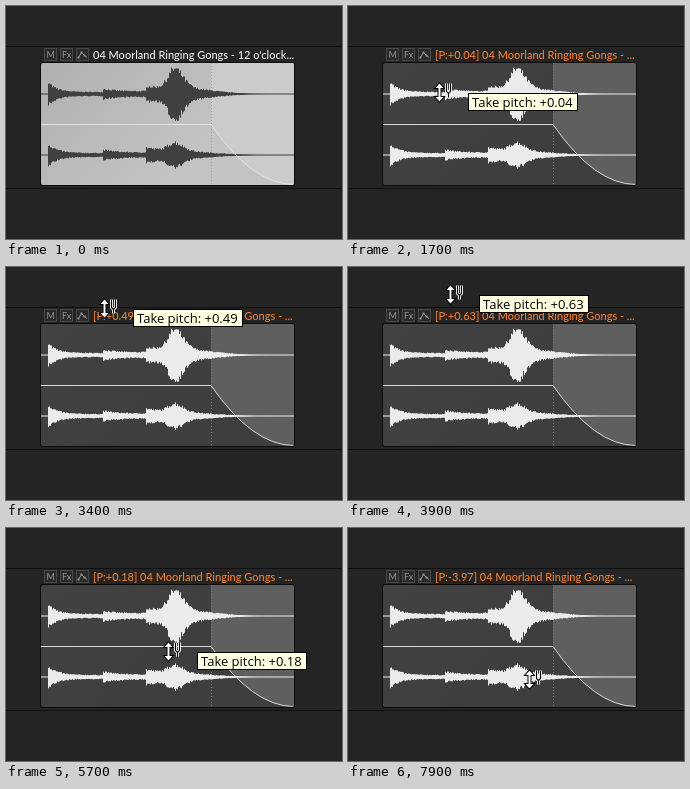
These frames come from a looping animation (336 by 233 pixels, 8 s). An HTML page with a canvas:

```html
<!DOCTYPE html>
<html lang="en">
<head>
<meta charset="utf-8">
<title>Take pitch drag</title>
<style>
  html, body { margin: 0; width: 100%; height: 100%; overflow: hidden; background: #242424; }
  canvas { display: block; }
</style>
</head>
<body>
<canvas id="stage" width="336" height="233"></canvas>
<script>
const ctx = document.getElementById('stage').getContext('2d');
const LOOP = 8000, STEP = 100;
const DRAG_START = 1000, DRAG_PAUSE = 4500, DRAG_RESUME = 5300, DRAG_END = 6500;
const NAME = '04 Moorland Ringing Gongs - ';
const ITEM = { x: 35, y: 57, w: 253, h: 122 };
const FADE_X = 205, GAIN_Y = 118.5, BOTTOM = ITEM.y + ITEM.h, RIGHT = ITEM.x + ITEM.w;

// Mouse moves; between them the pointer rests.
const moves = [
  { from: 100, to: 500, x: 103, y: 106 },
  { from: 700, to: 800, x: 91, y: 91 },
  { from: 1400, to: 2300, x: 92, y: 78 },
  { from: 2300, to: 2500, x: 93, y: 70 },
  { from: 2600, to: 3500, x: 99, y: 38 },
  { from: 3700, to: 3900, x: 102, y: 28 },
  { from: DRAG_PAUSE, to: 5200, x: 160, y: 79 },
  { from: DRAG_RESUME, to: 5800, x: 162, y: 135 },
  { from: 6000, to: 6400, x: 164, y: 179 },
  { from: DRAG_END, to: 6900, x: 186, y: 188 },
  { from: 7600, to: 7700, x: 185, y: 201 },
  { from: 7700, to: 7900, x: 181, y: 152 }
];

const clamp = v => Math.max(0, Math.min(1, v));
const mix = (a, b, k) => a + (b - a) * k;

function pointer(t) {
  let x = 51, y = 100;
  for (const m of moves) {
    const k = clamp((t - m.from) / (m.to - m.from));
    x = mix(x, m.x, k);
    y = mix(y, m.y, k);
  }
  return { x, y };
}

// One cent per pixel while dragging, then a coarse run down to the last value.
function cents(t, y) {
  if (t < DRAG_START) return 0;
  if (t <= DRAG_PAUSE) return Math.floor(91 - y);
  if (t <= DRAG_RESUME) return 63;
  if (t <= DRAG_END) return Math.floor(142 - y);
  return Math.round(mix(-37, -397, 1 - (1 - clamp((t - DRAG_END) / 600)) ** 3));
}

// Three struck notes over a thin bed, and one long swell.
const strike = (x, at, height, decay) => x < at ? 0 : height * Math.exp((at - x) / decay);
const bed = x => x < 42 ? 0 : 2.2 * clamp((250 - x) / 80);
const notes = x => bed(x) + strike(x, 42, 10, 9) + strike(x, 97, 3.5, 18) + strike(x, 140, 5.5, 20);
function swell(x) {
  const d = x - 168;
  return 18 * Math.exp(-((d / (d < 0 ? 9 : 12)) ** 2)) + 7 * Math.exp(-Math.abs(d) / (d < 0 ? 14 : 36)) * clamp((265 - x) / 60);
}

let seed = 7;
const random = () => (seed = seed * 16807 % 2147483647) / 2147483647;
const rough = () => .72 + .32 * random();
const channels = [{ mid: 88, gain: 1 }, { mid: 149, gain: .42 }].map(({ mid, gain }) => ({
  mid,
  columns: Array.from({ length: ITEM.w }, (_, i) => {
    const level = notes(ITEM.x + i) + gain * swell(ITEM.x + i);
    return { up: level * rough(), down: level * rough() };
  })
}));

function rect(x, y, w, h, color) {
  ctx.fillStyle = color;
  ctx.fillRect(x, y, w, h);
}

function text(str, x, y, font, color) {
  ctx.font = font;
  ctx.fillStyle = color;
  ctx.fillText(str, x, y);
}

function line(points, color, width = 1) {
  ctx.beginPath();
  points.forEach(p => ctx.lineTo(...p));
  ctx.strokeStyle = color;
  ctx.lineWidth = width;
  ctx.stroke();
}

function drawTrack() {
  rect(0, 0, 336, 233, '#242424');
  for (const y of [40, 182]) rect(0, y, 336, 1, '#101010');
}

function drawButtons() {
  const font = '9px Lato, sans-serif', ink = '#959595';
  for (const x of [38, 54, 70]) {
    rect(x, 42, 13, 13, '#484848');
    rect(x + 1, 43, 11, 11, '#292929');
  }
  text('M', 40.5, 52, font, ink);
  text('Fx', 56, 52, font, ink);
  const nodes = [[72.5, 51.5], [75.5, 46.5], [78.5, 49.5], [81, 51.5]];
  line(nodes, ink);
  nodes.slice(0, 3).forEach(([x, y]) => rect(x - 1, y - 1, 2, 2, ink));
}

function fadePath(startX, startY) {
  ctx.beginPath();
  ctx.moveTo(startX, startY);
  ctx.lineTo(FADE_X, GAIN_Y);
  ctx.quadraticCurveTo((FADE_X + RIGHT) / 2, BOTTOM - .5, RIGHT, BOTTOM - .5);
}

function drawItem(light) {
  const { x, y, w, h } = ITEM;
  const ink = light ? '#404040' : '#ebebeb';
  const shade = ctx.createLinearGradient(x, y, x + 120, BOTTOM);
  shade.addColorStop(0, light ? '#b0b0b0' : '#424242');
  shade.addColorStop(1, light ? '#c3c3c3' : '#3e3e3e');

  ctx.beginPath();
  ctx.roundRect(x - 1, y - 1, w + 2, h + 2, 3);
  ctx.fillStyle = '#0c0c0c';
  ctx.fill();

  ctx.save();
  ctx.beginPath();
  ctx.roundRect(x, y, w, h, 2);
  ctx.fillStyle = shade;
  ctx.fill();
  ctx.clip();

  fadePath(FADE_X, y);
  ctx.lineTo(RIGHT, y);
  ctx.fillStyle = light ? '#cbcbcb' : '#5f5f5f';
  ctx.fill();

  ctx.setLineDash([1, 2]);
  line([[FADE_X + .5, y], [FADE_X + .5, BOTTOM]], light ? '#a4a4a4' : '#787878');
  ctx.setLineDash([]);

  for (const { mid, columns } of channels) {
    rect(x, mid - .5, w, 1, ink);
    columns.forEach(({ up, down }, i) => rect(x + i, mid - up, 1, up + down, ink));
  }

  fadePath(x, GAIN_Y);
  ctx.strokeStyle = light ? '#e2e2e2' : '#d8d8d8';
  ctx.stroke();
  ctx.restore();
}

function drawCursor(x, y) {
  ctx.save();
  ctx.translate(Math.round(x) + .5, Math.round(y) - .5);

  // double arrow
  const side = [[0, -9], [4, -4.5], [1, -4.5], [1, 4.5], [4, 4.5]];
  ctx.beginPath();
  side.concat(side.map(([a, b]) => [-a, -b])).forEach(p => ctx.lineTo(...p));
  ctx.closePath();
  ctx.fillStyle = '#fff';
  ctx.strokeStyle = '#000';
  ctx.lineWidth = 2;
  ctx.stroke();
  ctx.fill();

  // tuning fork
  for (const [color, width] of [['#fff', 3], ['#000', 1.2]]) {
    line([[7, -9], [7, -1], [9, 1], [11, -1], [11, -9]], color, width);
    line([[9, 1], [9, 5]], color, width);
  }
  ctx.restore();
}

function drawTooltip(x, y, pitch) {
  const label = 'Take pitch: ' + pitch, font = '13px "Open Sans", sans-serif';
  const left = Math.round(x) + 29, top = Math.round(y);
  ctx.font = font;
  const w = Math.round(ctx.measureText(label).width) + 9;
  rect(left, top, w, 18, '#000');
  rect(left + 1, top + 1, w - 2, 16, '#ffffe1');
  text(label, left + 4, top + 13.5, font, '#000');
}

function draw(now) {
  const t = Math.floor(now % LOOP / STEP) * STEP;
  const { x, y } = pointer(t);
  const value = cents(t, y);
  const pitch = (value < 0 ? '-' : '+') + (Math.abs(value) / 100).toFixed(2);
  const light = t < DRAG_START;

  drawTrack();
  drawButtons();
  drawItem(light);
  const title = value ? `[P:${pitch}] ${NAME}...` : `${NAME}12 o'clock...`;
  text(title, 87, 53, '500 11px Lato, sans-serif', light ? '#f0f0f0' : '#f47f2e');
  if (t >= DRAG_START && t <= DRAG_END) drawTooltip(x, y, pitch);
  if (t >= moves[0].from) drawCursor(x, y);
}

const start = performance.now();
function tick() {
  draw(performance.now() - start);
  requestAnimationFrame(tick);
}
tick();
</script>
</body>
</html>
```
